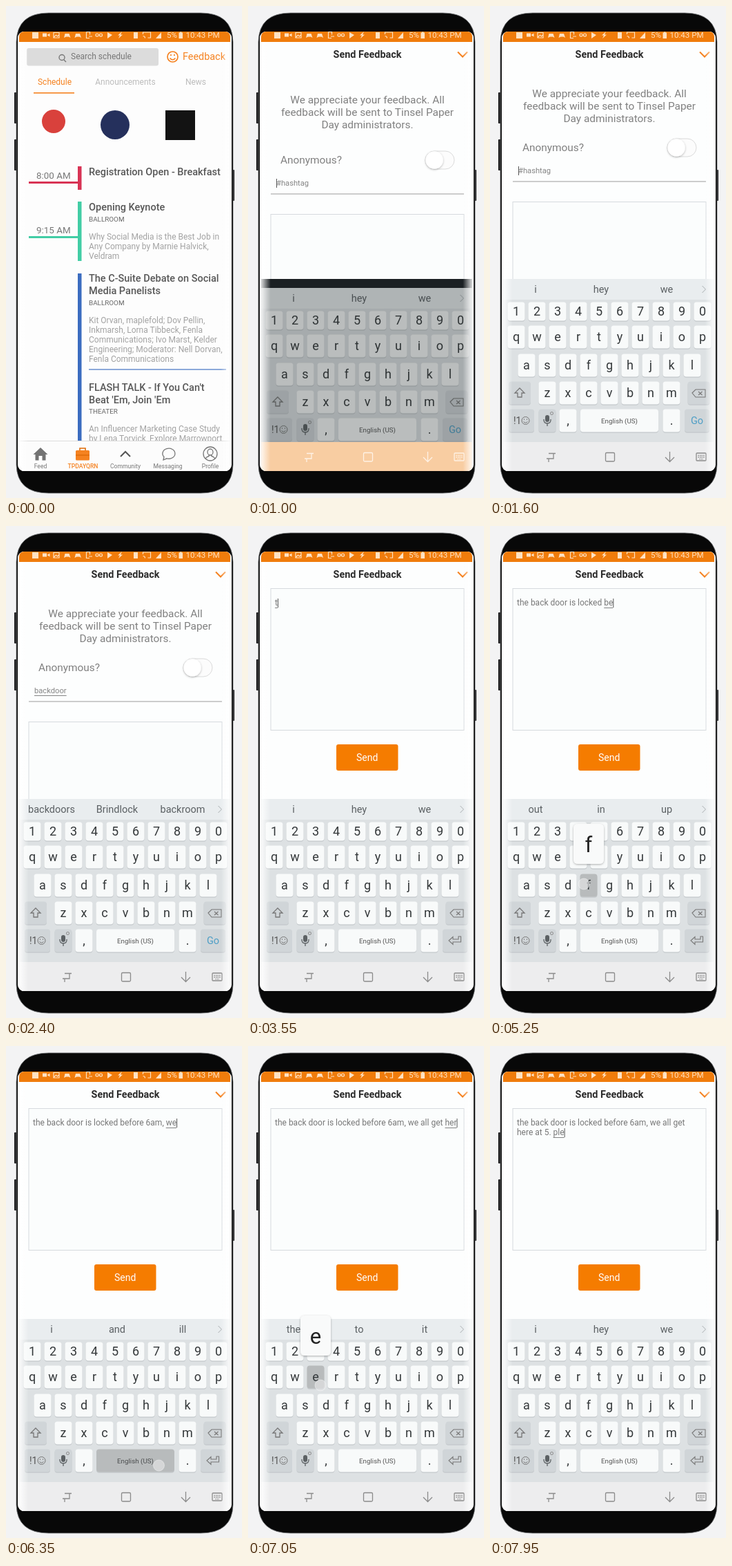
Write an HTML page that moves like this. It is 342 px wide and 712 px high and loops after 8000 ms.

```html
<!DOCTYPE html>
<html lang="en">
<head>
<meta charset="utf-8">
<title>Send feedback</title>
<style>
html, body { margin: 0; width: 100%; height: 100%; overflow: hidden; background: #f3f3f4; }
svg { display: block; width: 100%; height: 100%; }
text { font-family: Roboto, "Open Sans", sans-serif; font-size: 12px; fill: #777; }
.mid { text-anchor: middle; }
.title { font-size: 14.5px; font-weight: 500; fill: #585858; }
.place { font-size: 9.9px; fill: #666; }
.note { fill: #a2a2a2; }
.hour { font-size: 13.4px; }
.hot { fill: #f58220; }
.tab { fill: #bcbcbc; }
.label { font-size: 8.6px; }
.para, .ask { font-size: 15.4px; fill: #808080; }
.key { font-size: 18px; fill: #34383a; }
.hint { font-size: 14.5px; fill: #5b6063; }
.small { font-size: 11.2px; fill: #858585; }
.line { fill: none; stroke: #777; stroke-width: 1.3; }

.page, .para-box, .form, .scroll, .keys, .dark, .nav, .nav-bg, .nav-icons {
  animation: 8s linear infinite;
}
.page { animation-name: page; }
.para-box { animation-name: para; }
.form { animation-name: form; }
.scroll { animation-name: scroll; }
.keys { animation-name: keys; }
.dark { animation-name: dark; }
.nav { animation-name: nav; }
.nav-bg { animation-name: nav-bg; }
.nav-icons { animation-name: nav-icons; }
@keyframes page {
  0%, 2% { transform: translateY(640px); animation-timing-function: cubic-bezier(.2,.7,.3,1); }
  8%, 100% { transform: none; }
}
@keyframes para {
  0%, 14% { transform: none; animation-timing-function: ease-out; }
  17%, 100% { transform: translateY(-9px); }
}
@keyframes form {
  0%, 14% { transform: none; animation-timing-function: ease-out; }
  17%, 100% { transform: translateY(-18px); }
}
@keyframes scroll {
  0%, 34% { transform: none; animation-timing-function: ease-in-out; }
  38%, 100% { transform: translateY(-193px); }
}
@keyframes keys {
  0%, 11.2% { transform: translateY(70px); opacity: 0; }
  12.5% { transform: translateY(13px); opacity: .72; }
  14.5%, 100% { transform: none; opacity: 1; }
}
@keyframes dark {
  0%, 11.2% { opacity: 0; }
  11.8%, 100% { opacity: 1; }
}
@keyframes nav {
  0%, 10.8% { opacity: 0; }
  11.6%, 100% { opacity: 1; }
}
@keyframes nav-bg {
  0%, 12.5% { fill: #f8cda2; }
  15%, 100% { fill: #ededee; }
}
@keyframes nav-icons {
  0%, 12.5% { stroke: #fff3e6; }
  15%, 100% { stroke: #8b8b8b; }
}
</style>
</head>
<body>
<svg viewBox="0 0 342 712">
  <defs>
    <clipPath id="glass"><rect x="19" y="37" width="306" height="636" rx="7"/></clipPath>
    <clipPath id="board"><rect x="19" y="330" width="306" height="301"/></clipPath>
    <linearGradient id="shine">
      <stop offset="0" stop-color="#fff" stop-opacity=".85"/>
      <stop offset=".045" stop-color="#fff" stop-opacity="0"/>
      <stop offset=".955" stop-color="#fff" stop-opacity="0"/>
      <stop offset="1" stop-color="#fff" stop-opacity=".85"/>
    </linearGradient>
    <filter id="soft" x="-30%" y="-30%" width="160%" height="160%">
      <feDropShadow dx="0" dy="1" stdDeviation="1.5" flood-opacity=".3"/>
    </filter>
  </defs>

  <!-- phone body -->
  <g fill="#1d1d1f">
    <rect x="12" y="125" width="4" height="45" rx="1"/>
    <rect x="12" y="193" width="4" height="45" rx="1"/>
    <rect x="327" y="237" width="4" height="45" rx="1"/>
  </g>
  <path d="M15 52Q16 10 62 10H282Q328 10 329 52V664Q328 705 282 705H62Q16 705 15 664Z" fill="#080808" stroke="#77797b" stroke-width=".8"/>
  <rect x="17" y="37" width="310" height="636" rx="9" fill="#fbfbfb"/>

  <g clip-path="url(#glass)">
    <rect x="19" y="37" width="306" height="636" fill="#fdfdfd"/>
    <g id="schedule"></g>

    <g class="page">
      <rect x="19" y="52" width="306" height="640" fill="#fdfefe"/>
      <g class="scroll">
        <g class="para-box" id="para"></g>
        <g class="form" id="form">
          <rect x="257" y="210" width="42" height="26" rx="13" fill="#fcfcfc" stroke="#dadada"/>
          <circle cx="270" cy="223" r="12.7" fill="#fff" filter="url(#soft)"/>
          <path d="M33 272H313" stroke="#9b9b9b"/>
          <rect x="33" y="301.5" width="280" height="205" fill="#fbfdfd" stroke="#d6dade"/>
          <rect x="128" y="527" width="89.5" height="38" rx="3" fill="#f57c00"/>
          <text id="tag" class="small" x="41" dy=".36em" y="256"></text>
          <text id="row1" x="39" y="326"></text>
          <text id="row2" x="39" y="340"></text>
          <path id="under" stroke="#777" stroke-width=".9"/>
          <path id="caret" stroke="#555"/>
        </g>
      </g>
      <rect x="19" y="52" width="306" height="36" fill="#fdfefe"/>
      <text class="mid" x="173" y="74.5" style="font-size:14.4px;font-weight:700;fill:#2b2b2b">Send Feedback</text>
      <path d="M304 66.5L311 73.5L318 66.5" fill="none" stroke="#f58220" stroke-width="2"/>
    </g>

    <g class="nav">
      <rect class="nav-bg" x="19" y="631" width="306" height="42"/>
      <g class="nav-icons" fill="none" stroke-width="1.3">
        <path d="M85 647.5H95M92 647.5V655H82M85 660V655"/>
        <rect x="167.5" y="646.5" width="13" height="12.5" rx="1.5"/>
        <path d="M260.5 645V659M254 653L260.5 659.5L267 653"/>
        <rect x="299" y="647" width="14" height="11" rx="1"/>
        <path d="M301.5 650.5H311M301.5 653H311M303.5 655.7H309" stroke-dasharray="1.5 1"/>
      </g>
    </g>

    <g clip-path="url(#board)">
      <rect class="dark" x="19" y="395" width="306" height="236" fill="#1b2023"/>
      <g class="keys">
        <rect x="19" y="395" width="306" height="240" fill="#dde1e3"/>
        <rect x="19" y="395" width="306" height="30" fill="#e9edef"/>
        <path d="M307.5 405L312.5 410L307.5 415" fill="none" stroke="#a9aeb1"/>
        <g id="hints"></g>
        <g id="keyboard"></g>
      </g>
    </g>
    <g id="press">
      <rect id="dim" rx="4" fill="#33383b" fill-opacity=".32"/>
      <g id="popup">
        <rect x="-22" y="-89" width="44" height="58" rx="6" fill="#f9fafa" filter="url(#soft)"/>
        <text id="big" class="mid" y="-48" style="font-size:31px;fill:#222"></text>
      </g>
      <circle id="touch" r="8" fill="#e3e4e5" fill-opacity=".65" stroke="#fff" stroke-opacity=".4"/>
    </g>

    <rect x="19" y="52" width="306" height="621" fill="url(#shine)"/>

    <!-- status bar -->
    <rect x="19" y="36" width="306" height="16" fill="#f07c0c"/>
    <g fill="#ffe2c3">
      <rect x="38" y="38" width="9" height="9"/>
      <path d="M53 39.5h6v5h-6zM59.5 42l4-2.5v5z"/>
      <path d="M84 46l1.5-6h6l2 6l-2.5-1.5h-4zM99.5 46l1.5-6h6l2 6l-2.5-1.5h-4z"/>
      <path d="M147 38l7 4l-7 5zM168 37l-6 5.5h3l-2 4.5l6-5.5h-3z"/>
      <path d="M185 38h6v9h-6z"/>
      <path d="M217 47h8v-9z"/>
      <path d="M250.5 38.5h1.5v-1h2.5v1h1.5v8.5h-5.5z"/>
    </g>
    <g fill="none" stroke="#ffe2c3" stroke-width="1.2">
      <path d="M69 38.5h8v7.5h-8zM69.5 45l3-3l2 2l2-2"/>
      <path d="M116.5 37.5h5v4M121 46.5h-4.5v-9M120 44h5"/>
      <circle cx="132" cy="42" r="2"/><circle cx="137.5" cy="42" r="2"/>
      <path d="M198.5 41v-3h11v8h-4M198.5 43.5q3 0 3 3"/>
    </g>
    <text x="233" y="46" style="font-size:11.6px;fill:#ffe2c3">5%</text>
    <text x="260.5" y="46" style="font-size:11.6px;fill:#ffe2c3">10:43 PM</text>
  </g>
</svg>
<script>
const $ = id => document.getElementById(id);
const add = (id, html) => $(id).insertAdjacentHTML('beforeend', html);
const label = (x, y, s, cls = '', css = '') =>
  `<text x="${x}" y="${y}" dy=".36em" class="${cls}" style="${css}">${s}</text>`;
const block = (x, y, step, rows, cls) => rows.map((s, i) => label(x, y + i * step, s, cls)).join('');
const box = (x, y, w, h, fill, rx = 0) =>
  `<rect x="${x}" y="${y}" width="${w}" height="${h}" rx="${rx}" fill="${fill}"/>`;
const icon = (d, css = '') => `<path class="line" d="${d}" style="${css}"/>`;

// schedule page
add('schedule',
  box(30, 61, 191, 25.5, '#dcdcdc', 3) +
  icon('M84 78L87 81M85 74.5a4 4 0 1 1-8 0a4 4 0 1 1 8 0', 'stroke-width:1.4') +
  label(94, 73, 'Search schedule') +
  icon('M249 73.5a7.5 7.5 0 1 1-15 0a7.5 7.5 0 1 1 15 0M237.5 75.5q4 4.5 8 0M239 70v2M244 70v2', 'stroke:#f58220;stroke-width:1.7') +
  label(256, 73, 'Feedback', 'hot', 'font-size:14.4px') +
  label(70.5, 110, 'Schedule', 'mid hot') +
  label(173, 110, 'Announcements', 'mid tab') +
  label(275, 110, 'News', 'mid tab') +
  box(40, 125, 59, 1.6, '#f58220') +
  '<circle cx="69" cy="167" r="17" fill="#d9413c"/><circle cx="158" cy="172" r="21" fill="#25305c"/>' +
  box(231, 151, 43, 43, '#131313') +
  box(33, 254, 76, 3, '#d83354') + box(104, 232, 5.5, 34, '#d83354') +
  box(33, 333, 76, 3, '#42cda5') + box(104, 283, 5.5, 86, '#42cda5') +
  box(104, 387, 5.5, 242, '#3b6cc0') + box(120, 525.3, 199, 1.4, '#5d86cc') +
  label(44, 245, '8:00 AM', 'hour') + label(44, 324, '9:15 AM', 'hour') +
  label(120, 240, 'Registration Open - Breakfast', 'title') +
  label(120, 291, 'Opening Keynote', 'title') +
  label(120, 308, 'BALLROOM', 'place') +
  block(120, 334, 13.8, ['Why Social Media is the Best Job in', 'Any Company by Marnie Halvick,', 'Veldram'], 'note') +
  block(120, 394, 17.5, ['The C-Suite Debate on Social', 'Media Panelists'], 'title') +
  label(120, 429, 'BALLROOM', 'place') +
  block(120, 455, 13.8, ['Kit Orvan, maplefold; Dov Pellin,', 'Inkmarsh, Lorna Tibbeck, Fenla',
    'Communications; Ivo Marst, Kelder', 'Engineering; Moderator: Nell Dorvan,', 'Fenla Communications'], 'note') +
  block(120, 552, 17.5, ["FLASH TALK - If You Can't", "Beat 'Em, Join 'Em"], 'title') +
  label(120, 586, 'THEATER', 'place') +
  block(120, 612, 13.8, ['An Influencer Marketing Case Study', 'by Lena Torvick, Explore Marrowport'], 'note') +
  box(19, 629, 306, 45, '#fcfcfc') + box(19, 629, 306, 1, '#dcdcdc') +
  '<path d="M39.5 649L50 639L60.5 649H57.5V657.5H52.5V651H47.5V657.5H42.5V649Z" fill="#737373"/>' +
  box(101, 643, 20, 14.5, '#f58220', 1.5) + icon('M107 643V640H115V643M101 650H121', 'stroke:#e06c08;stroke-width:1.6') +
  icon('M166 652L173 645L180 652', 'stroke:#555;stroke-width:2') +
  icon('M228 657l1-4.5a9 7.5 0 1 1 4 2.3z') +
  icon('M306 648a10 10 0 1 1-20 0a10 10 0 1 1 20 0M300 645.5a4 4.5 0 1 1-8 0a4 4.5 0 1 1 8 0M289 655q2-3 5-3.5v-2M303 655q-2-3-5-3.5v-2') +
  ['Feed', 'TPDAYQRN', 'Community', 'Messaging', 'Profile'].map((s, i) =>
    label(50 + i * 61.5, 665.5, s, 'mid label' + (i === 1 ? ' hot' : ''), i === 1 ? 'font-weight:500' : '')).join(''));

// feedback page
add('para', block(173, 135, 18.4, ['We appreciate your feedback. All',
  'feedback will be sent to Tinsel Paper', 'Day administrators.'], 'para mid'));
add('form', label(47, 222, 'Anonymous?', 'ask') +
  label(172.7, 546, 'Send', 'mid', 'font-size:14px;fill:#fff'));

// keyboard
const spot = {};
const keyBox = (ch, x, y, w, h, fill = '#f8fafa') => {
  spot[ch] = { x, y, w, h };
  return box(x - w / 2, y - h / 2 + 1.2, w, h, '#c3c8cb', 4) + box(x - w / 2, y - h / 2, w, h, fill, 4);
};
const row = (chars, x, y, h) => [...chars].map((ch, i) =>
  keyBox(ch, x + i * 30, y, 25, h) + label(x + i * 30, y, ch, 'key mid')).join('');
const grey = '#d0d5d8';
add('keyboard',
  row('1234567890', 38, 442, 27) + row('qwertyuiop', 38, 479, 33) +
  row('asdfghjkl', 53, 520, 33) + row('zxcvbnm', 83, 560, 33) +
  keyBox('shift', 43, 560, 32, 33, grey) + icon('M43 553L50 560H46V566H40V560H36Z') +
  keyBox('del', 302.5, 560, 32, 33, grey) + icon('M293 560L298 555H312V566H298ZM302 558L307.5 563M307.5 558L302 563', 'stroke-width:1.1') +
  keyBox('sym', 45.5, 600, 37, 33, grey) + label(34, 600, '!1', '', 'font-size:14px;fill:#555') +
  icon('M57 600a5.5 5.5 0 1 1-11 0a5.5 5.5 0 1 1 11 0M48.5 601.5q3 3.5 6 0M49.5 597.5v1.5M53.5 597.5v1.5', 'stroke-width:1') +
  keyBox('mic', 83, 600, 25, 33, grey) + box(80, 592, 6, 10, '#5c6164', 3) +
  icon('M78 598v1q0 5 5 5t5-5v-1M83 604v4', 'stroke:#5c6164') +
  '<circle cx="89.5" cy="589.5" r="2" fill="none" stroke="#888"/>' +
  row(',', 113, 600, 33) + keyBox(' ', 187.5, 600, 113, 33) +
  label(187.5, 600.5, 'English (US)', 'mid', 'font-size:9.8px;fill:#555') +
  row('.', 263, 600, 33) + keyBox('go', 300, 600, 36, 33, grey) +
  '<g id="go">' + label(300, 600, 'Go', 'mid', 'font-size:14.5px;fill:#4f9fc6') + '</g>' +
  '<g id="enter">' + icon('M308.5 594V602H297V605.5L291 600L297 594.5V598H305V594Z', 'stroke-width:1.1') + '</g>');
add('hints', [66, 161, 256].map(x => label(x, 410, '', 'hint mid')).join(''));

// each burst: first press, last press, keys
const bursts = [
  [1700, 2270, 'backdoor'], [3450, 3680, 'the'], [3900, 4350, ' back door '],
  [4440, 4680, 'is loc'], [4750, 4850, 'ked'], [5050, 5150, ' be'],
  [5240, 5780, 'fore 6am'], [5900, 6230, ', we'], [6340, 6690, ' all get'],
  [6750, 7490, ' here at 5. '], [7600, 7840, 'ple']
];
const presses = bursts.flatMap(([a, b, s]) =>
  [...s].map((ch, i) => ({ ch, at: a + (b - a) * i / (s.length - 1) })));
const hints = [
  [0, 'i hey we'], [1780, 'but be by'], [1900, 'back bad bag'], [2060, 'back backs backed'],
  [2250, 'backdoors Brindlock backroom'], [2700, 'i hey we'], [3570, 'the this they'],
  [3950, 'same first best'], [4150, 'black beck backs'], [4650, 'is it in'],
  [4900, 'lock locked look'], [5120, 'out in up'], [5650, 'before be being'],
  [6000, 'i and ill'], [6650, 'are all have'], [7000, 'the to it'], [7400, 'i hey we']
];
const TYPED = 65, HOLD = 85, TAG = 8, SWITCH = 2700;
const nbsp = s => s.replace(/ /g, '\u00a0');
const width = (el, n) => n > 0 ? el.getSubStringLength(0, n) : 0;
const show = (id, on) => $(id).setAttribute('visibility', on ? 'inherit' : 'hidden');

// underline the word being written and set the caret behind it
function mark(el, s, x, base, caret) {
  const word = s.match(/[a-z0-9]*$/)[0].length;
  const end = x + width(el, s.length), from = x + width(el, s.length - word);
  $('under').setAttribute('d', word ? `M${from} ${base + 3.5}H${end}` : '');
  $('caret').setAttribute('d', caret ? `M${end + .5} ${base - 10}V${base + 3}` : '');
}

function draw(t) {
  const done = presses.filter(p => p.at + TYPED <= t).map(p => p.ch).join('');
  const tag = done.substring(0, TAG), body = done.substring(TAG);
  const cut = body.length > 50 ? 46 : body.length;
  const one = body.substring(0, cut), two = body.substring(cut + 1);
  $('tag').textContent = tag || '#hashtag';
  $('row1').textContent = nbsp(one);
  $('row2').textContent = nbsp(two);
  if (t < SWITCH) mark($('tag'), tag, 41, 260, t > 900 && tag.length < TAG);
  else if (cut < body.length) mark($('row2'), two, 39, 340, true);
  else mark($('row1'), one, 39, 326, true);

  show('go', t < SWITCH);
  show('enter', t >= SWITCH);
  const words = hints.filter(h => h[0] <= t).pop()[1].split(' ');
  [...$('hints').children].forEach((el, i) => el.textContent = words[i]);

  const now = presses.filter(p => p.at <= t).pop();
  const down = now && t < now.at + HOLD;
  show('press', down);
  if (!down) return;
  const { x, y, w, h } = spot[now.ch];
  const [dx, dy] = { ' ': [34, 7], f: [-7, -2] }[now.ch] || [7, 12];
  const set = { x: x - w / 2, y: y - h / 2, width: w, height: h };
  for (const k in set) $('dim').setAttribute(k, set[k]);
  show('popup', /\w/.test(now.ch));
  $('popup').setAttribute('transform', `translate(${x} ${y})`);
  $('big').textContent = now.ch;
  $('touch').setAttribute('cx', x + dx);
  $('touch').setAttribute('cy', y + dy);
}

let start;
function tick(now) {
  start ??= now;
  draw((now - start) % 8000);
  requestAnimationFrame(tick);
}
draw(0);
requestAnimationFrame(tick);
</script>
</body>
</html>
```
